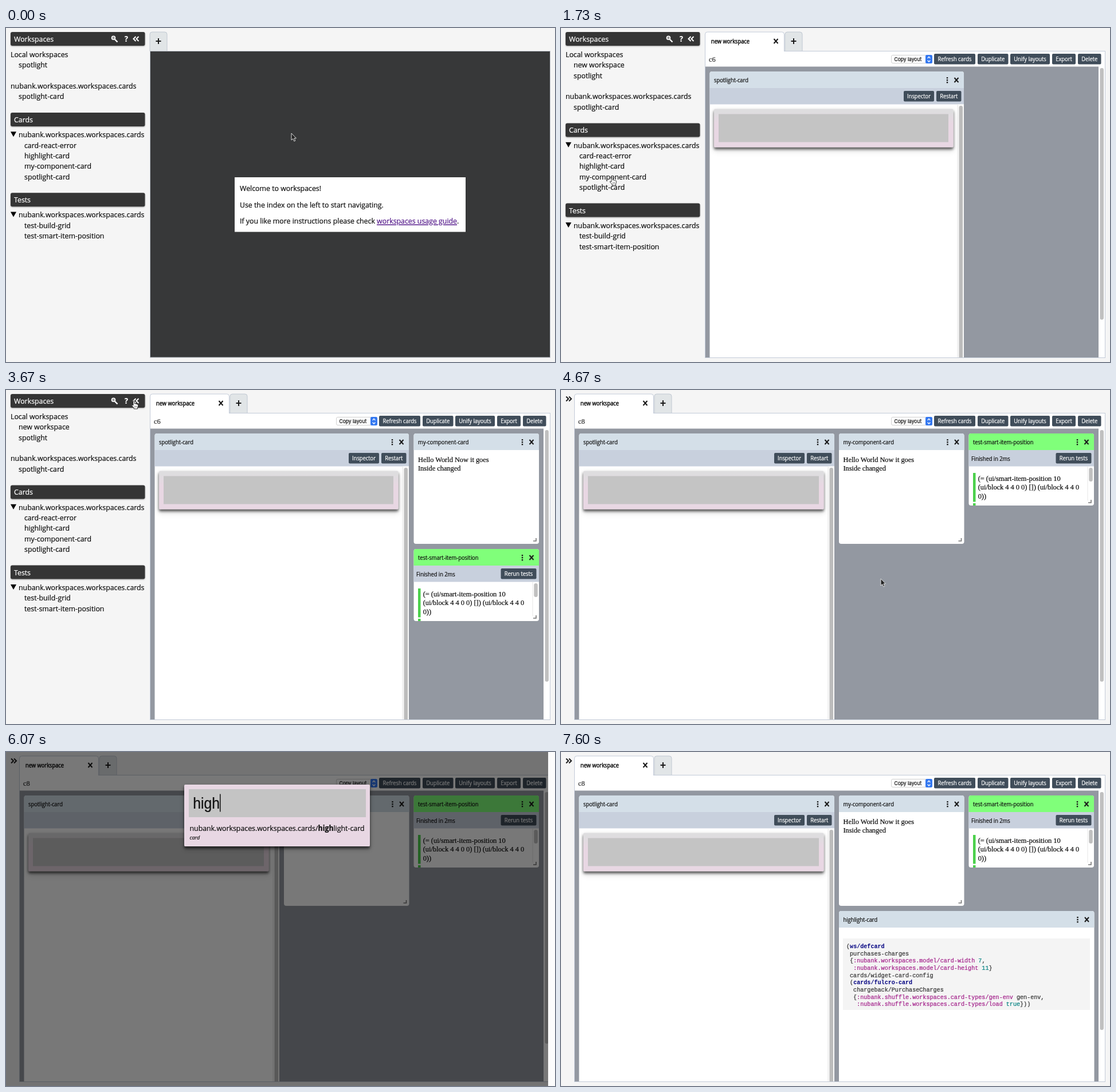
An HTML page for the animation above (8 s loop, 958 px wide and 584 px high).

```html
<!DOCTYPE html>
<html lang="en">
<head>
<meta charset="utf-8">
<title>Workspaces</title>
<style>
html, body { margin: 0; width: 100%; height: 100%; overflow: hidden; background: #f5f5f5; }
svg { display: block; width: 100%; height: 100%; }
text { font-family: "Open Sans", sans-serif; white-space: pre; stroke-width: .25px; }
.serif { font-family: "Liberation Serif", serif; }
.mono { font-family: "Liberation Mono", monospace; }
.sans { font-family: "Liberation Sans", sans-serif; }
.ui { font-family: Inter, sans-serif; }
.mid { text-anchor: middle; }
.b { font-weight: 700; }
.i { font-style: italic; }
.semi { stroke-width: .5px; }
.link { fill: #551a8b; stroke: #551a8b; text-decoration: underline; }
.fn { fill: #000080; stroke: none; font-weight: 700; }
.kw { fill: #a3208a; stroke: #a3208a; }
.num { fill: #008080; stroke: #008080; }
</style>
</head>
<body>
<svg viewBox="0 0 958 584" preserveAspectRatio="none">
  <defs>
    <clipPath id="view"><rect x="0" y="67" width="938" height="509"/></clipPath>
    <linearGradient id="pink" x1="0" y1="0" x2="0" y2="1">
      <stop offset=".08" stop-color="#dedddf"/><stop offset=".4" stop-color="#e8d7e3"/>
    </linearGradient>
    <filter id="drop" x="-10%" y="-30%" width="120%" height="180%">
      <feDropShadow dx="0" dy="3.5" stdDeviation="2.2" flood-opacity=".6"/>
      <feDropShadow dx="0" dy="3" stdDeviation="4" flood-opacity=".2"/>
    </filter>
    <filter id="soft" x="-5%" y="-20%" width="110%" height="160%">
      <feDropShadow dx="0" dy="1" stdDeviation="1" flood-opacity=".35"/>
    </filter>
  </defs>
  <g id="stage"></g>
</svg>
<script>
const stage = document.getElementById('stage');
const FPS = 15, TICKS = 120, SQUEEZE = .915, ROW = 18.4;
const NS = 'nubank.workspaces.workspaces.cards';

const lerp = (a, b, k) => a + (b - a) * k;
const ease = (t, a, b) => {
  const k = Math.min(1, Math.max(0, (t - a) / (b - a)));
  return k * k * (3 - 2 * k);
};

// Text is placed by its vertical centre; the whole screen is slightly narrow.
const text = (x, y, s, size = 13.5, cls = '', fill = '#111') =>
  `<text transform="translate(${x} ${y + size * .36}) scale(${SQUEEZE} 1)" font-size="${size}" class="${cls}" fill="${fill}" stroke="${fill}">${s}</text>`;
const rect = (x, y, w, h, fill, r = 0, more = '') =>
  `<rect x="${x}" y="${y}" width="${w}" height="${h}" fill="${fill}" rx="${r}" ${more}/>`;
const line = (d, color, width = 2) =>
  `<path d="${d}" fill="none" stroke="${color}" stroke-width="${width}"/>`;
const span = (cls, s) => `<tspan class="${cls}">${s}</tspan>`;
const cross = (x, y) => line(`M${x - 3.5} ${y - 4}l7 8m0-8l-7 8`, '#1a1a1a', 2);
const chevrons = (x, y, dir, color) =>
  [0, 5].map(o => line(`M${x + o} ${y - 4}l${4 * dir} 4l${-4 * dir} 4`, color, 2)).join('');
const button = (x, y, w, s) =>
  rect(x, y, w, 18.5, '#404d5a', 2) + text(x + w / 2, y + 9, s, 10.2, 'mid', '#fff');

const bar = (y, s) => rect(8, y, 234.5, 24, '#363636', 3, 'filter="url(#soft)"') + text(14, y + 12.2, s, 13.5, '', '#fff');

function section(y, title, items) {
  const cy = y + 38.3;
  return bar(y, title) + `<path d="M8 ${cy - 5}h10l-5 9z"/>` + text(22, cy, NS) +
    items.map((s, i) => text(32, cy + ROW * (i + 1), s)).join('');
}

function sidebar(hasNew) {
  const local = hasNew ? ['new workspace', 'spotlight'] : ['spotlight'];
  const d = hasNew ? ROW : 0;
  return bar(7, 'Workspaces') +
    '<circle cx="187.5" cy="17.2" r="3" fill="#999" stroke="#fff" stroke-width="1.6"/>' + line('M190 20l4.5 4.5', '#fff', 2.4) +
    text(210, 19, '?', 13.5, 'mid b', '#fff') + chevrons(226.5, 19, -1, '#fff') +
    text(8, 46, 'Local workspaces') +
    local.map((s, i) => text(22, 46 + ROW * (i + 1), s)).join('') +
    text(8, 101.2 + d, NS) + text(22, 119.6 + d, 'spotlight-card') +
    section(148 + d, 'Cards', ['card-react-error', 'highlight-card', 'my-component-card', 'spotlight-card']) +
    section(288.2 + d, 'Tests', ['test-build-grid', 'test-smart-item-position']);
}

const plusTab = x =>
  `<path d="M${x} 40V11q0-4 4-4h22q4 0 4 4v29" fill="#e1e5e7" stroke="#c0c8d2"/>` +
  line(`M${x + 10.5} 23h9m-4.5-5v10`, '#1a1a1a', 2);

function welcome() {
  return plusTab(251) + rect(251.5, 40.5, 698, 535.5, '#373839', 0, 'stroke="#b5bac2"') +
    rect(399, 261, 403, 95.5, '#fff') +
    text(408, 280.5, 'Welcome to workspaces!') +
    text(408, 309, 'Use the index on the left to start navigating.') +
    text(408, 337.5, `If you like more instructions please check ${span('link', 'workspaces usage guide')}.`);
}

function frame(x, label, thumb) {
  return plusTab(x + 140) + rect(x + .5, 40.5, 949 - x, 536, '#fff', 0, 'stroke="#c3cbd8"') +
    `<path d="M${x + .5} 41V11q0-4 4-4h130q4 0 4 4v30" fill="#fff" stroke="#c3cbd8"/>` + rect(x + 1, 39.5, 137, 3, '#fff') +
    text(x + 11, 23, 'new workspace', 10.2, 'semi') + cross(x + 124, 23) +
    (label && text(x + 7, 54, label, 13.5, 'serif', '#333')) +
    rect(576.5, 47.5, 71, 14, '#fff', 2.5, 'stroke="#d0d0d0"') + text(581.5, 54.5, 'Copy layout', 9.3, 'ui') +
    rect(636, 47, 12, 15, '#3478f0', 2.5) + line('M639.7 53l2.3-2.7 2.3 2.7m-4.6 3.5l2.3 2.7 2.3-2.7', '#fff', 1.2) +
    [[651, 72, 'Refresh cards'], [727, 53.5, 'Duplicate'], [784, 69, 'Unify layouts'], [857, 41, 'Export'], [902, 40.5, 'Delete']]
      .map(([bx, w, s]) => button(bx, 45, w, s)).join('') +
    rect(x + 1, 67.5, 937 - x, 508.5, '#9398a1') +
    (thumb ? rect(940.5, 70, 6.5, thumb - 70, '#c0c0c0', 3.2) : '');
}

function card(x, y, w, h, title, { head = '#d4dfe8', tools, body = '' } = {}) {
  const dots = [-4, 0, 4].map(d => rect(w - 30.2, 14 + d, 2.4, 2.4, '#1a1a1a')).join('');
  return `<g transform="translate(${x} ${y})">` + rect(0, 0, w, h, '#fff', 4) +
    `<path d="M0 29V4q0-4 4-4h${w - 8}q4 0 4 4v25z" fill="${head}"/>` +
    text(7.5, 15, title, 10.2) + dots + cross(w - 13, 15) +
    (tools ? rect(0, 29, w, 28.5, '#c8d0dd') + tools : '') + body +
    line(`M${w - 10} ${h - 5}h5v-5`, '#777', 1.6) + '</g>';
}

const spotlightCard = (x, w, h) => card(x, 76, w, h, 'spotlight-card', {
  tools: button(w - 105, 34, 53, 'Inspector') + button(w - 48, 34, 43.5, 'Restart'),
  body: rect(w - 11, 57.5, 11, h - 62, '#fafafa') + line(`M${w - 11} 57.5v${h - 62}`, '#e6e6e6', 1) +
    rect(w - 8.5, 60, 6.5, h - 66, '#bcbcbc', 3.2) +
    rect(7.5, 65.5, w - 26, 67, 'url(#pink)', 2, 'filter="url(#drop)"') + rect(15.5, 74.5, w - 42.5, 49, '#c4c4c4')
});

const componentCard = x => card(x, 76, 218.5, 193, 'my-component-card', {
  body: text(7.5, 45.2, 'Hello World Now it goes', 13.5, 'serif') + text(7.5, 60.3, 'Inside changed', 13.5, 'serif')
});

function testCard(x, y, done) {
  const code = ['(= (ui/smart-item-position 10', '(ui/block 4 4 0 0) []) (ui/block 4 4 0', '0))'];
  return card(x, y, 218.5, 126, 'test-smart-item-position', {
    head: done ? '#80ff7a' : undefined,
    tools: button(152, 34, 62, 'Rerun tests') + (done ? text(4.5, 44, 'Finished in 2ms', 10.2) : ''),
    body: done ? rect(7.5, 69, 4.5, 50.5, '#4bd04b') + rect(7.5, 122, 4.5, 4, '#4bd04b') +
      code.map((s, i) => text(16.2, 78.5 + 15.1 * i, s, 13.5, 'serif')).join('') +
      line('M207.5 57.5v60', '#e6e6e6', 1) + rect(209.8, 60, 6.5, 24, '#c0c0c0', 3.2) : ''
  });
}

const kw = s => span('kw', s), num = s => span('num', s), fn = s => span('fn', s);
const CODE = [
  '(' + fn('ws/defcard'),
  ' purchases-charges',
  ` {${kw(':nubank.workspaces.model/card-width')} ${num(7)},`,
  `  ${kw(':nubank.workspaces.model/card-height')} ${num(11)}}`,
  ' cards/widget-card-config',
  ` (${fn('cards/fulcro-card')}`,
  '  chargeback/PurchaseCharges',
  `  {${kw(':nubank.shuffle.workspaces.card-types/gen-env')} gen-env,`,
  `   ${kw(':nubank.shuffle.workspaces.card-types/load')} ${num('true')}}))`
];
const highlightCard = ready => card(485, 278, 445.5, 320, 'highlight-card', {
  body: ready ? rect(7, 48, 431, 125, '#f4f4f4') +
    CODE.map((s, i) => text(13, 61 + 12.65 * i, s, 11.05, 'mono', '#333')).join('') : ''
});

const OPTIONS = [
  ...['card-react-error', 'highlight-card', 'my-component-card', 'spotlight-card'].map(s => [`${NS}/${s}`, 'card']),
  ...['test-build-grid', 'test-smart-item-position'].map(s => [`${NS}/${s}`, 'test']),
  [NS, 'test-ns'], ['All tests', 'test-all'],
  ['new workspace', 'workspace'], ['spotlight', 'workspace'], [`${NS}/spotlight-card`, 'workspace']
];
const CARET = [0, 13.7, 19.2, 33, 46.7];

function spotlight(t) {
  const typed = Math.max(0, Math.min(4, t - 86));
  const query = 'high'.slice(0, typed), match = t > 88 ? query : typed ? 'h' : '';
  const list = t < 88 ? OPTIONS : OPTIONS.filter(([s]) => s.includes(match));
  const w = t < 88 ? 384 : 324, x = 473 - w / 2;
  const caret = t < 82 || (t >= 87 && t < 99) || t >= 106;
  const rows = list.map(([s, type], i) => {
    const y = 122 + 35 * i;
    return (t >= 101 ? rect(x + 8, y - 1, w - 15, 36, '#cdb9cf') : '') +
      text(x + 9.5, y + 11, match ? s.replace(match, span('b', match)) : s) + text(x + 9.5, y + 27, type, 9.8, 'i');
  }).join('');
  return rect(0, 0, 946, 584, '#000', 0, 'opacity=".53"') + rect(946, 0, 12, 584, '#fcfcfc') +
    rect(x, 57, w, 73 + 35 * list.length, '#e8d7e3', 2, 'filter="url(#drop)"') +
    rect(x + 8, 65, w - 15, 49, '#c4c4c4') + text(x + 15.3, 89.5, query, 27, 'sans') +
    (caret ? rect(x + 15.3 + CARET[typed], 73.5, 1.5, 31, '#111') : '') + rows;
}

// start tick, end tick, then from and to positions
const MOVES = [
  [2, 12, 498, 184, 88, 261], [28, 35, 88, 261, 112, 385], [41, 53, 112, 385, 224, 21],
  [53, 55, 224, 21, 222, 19], [62, 70, 222, 19, 558, 330]
];
function cursor(t) {
  const [a, b, x0, y0, x1, y1] = MOVES.filter(m => t >= m[0]).pop() || MOVES[0];
  const k = ease(t, a, b);
  const hand = (t >= 11 && t < 43) || (t >= 52 && t < 63);
  const shape = hand
    ? '<path d="M0 1.5Q0 0 1.2 0Q2.4 0 2.5 1.5V5Q4 4.2 4.7 5.3Q6.2 4.8 6.8 6Q8.6 5.6 8.7 7.5Q8.7 10 7.6 11.5V14H1.2V12L-2.8 8Q-2.4 6 0 8Z" fill="#fff" stroke="#222" stroke-width=".9"/>' +
      line('M2.6 8.5v3m1.7-3v3m1.7-3v3', '#444', .6)
    : '<path d="M0 0V12L2.8 9.6L4.8 14L6.8 13.1L4.9 8.8H8.4Z" fill="#222" stroke="#eee" stroke-width=".9"/>';
  return `<g transform="translate(${lerp(x0, x1, k)} ${lerp(y0, y1, k)})">${shape}</g>`;
}

function scene(t) {
  if (t < 18) return sidebar(false) + welcome() + cursor(t);
  const wide = t >= 62, left = wide ? 23 : 251;
  const grow = ease(t, 18, 24), slide = ease(t, 61, 65);
  let cards = '';
  if (t >= 19) cards += spotlightCard(left + 8.5, lerp(218, wide ? 445.5 : 443.5, grow), lerp(193, 520, grow));
  if (t >= 29) cards += componentCard(wide ? 485 : 711.5);
  if (t >= 41) cards += testCard(wide ? lerp(483, 711.5, slide) : 711.5, lerp(278, 76, slide), t >= 43);
  if (t >= 113) cards += highlightCard(t >= 114);
  const thumb = t < 19 ? 0 : t < 113 ? 510 : 486;
  return (wide ? chevrons(9, 15.5, 1, '#1a1a1a') : sidebar(true)) +
    frame(left, t < 19 ? '' : wide ? 'c8' : 'c6', thumb) +
    `<g clip-path="url(#view)">${cards}</g>` +
    (t < 75 ? cursor(t) : t < 113 ? spotlight(t) : '');
}

let shown = -1;
function draw(now) {
  const t = Math.floor((now + 3.5) * FPS / 1000) % TICKS;
  if (t !== shown) stage.innerHTML = scene(shown = t);
  requestAnimationFrame(draw);
}
draw(0);
</script>
</body>
</html>
```
